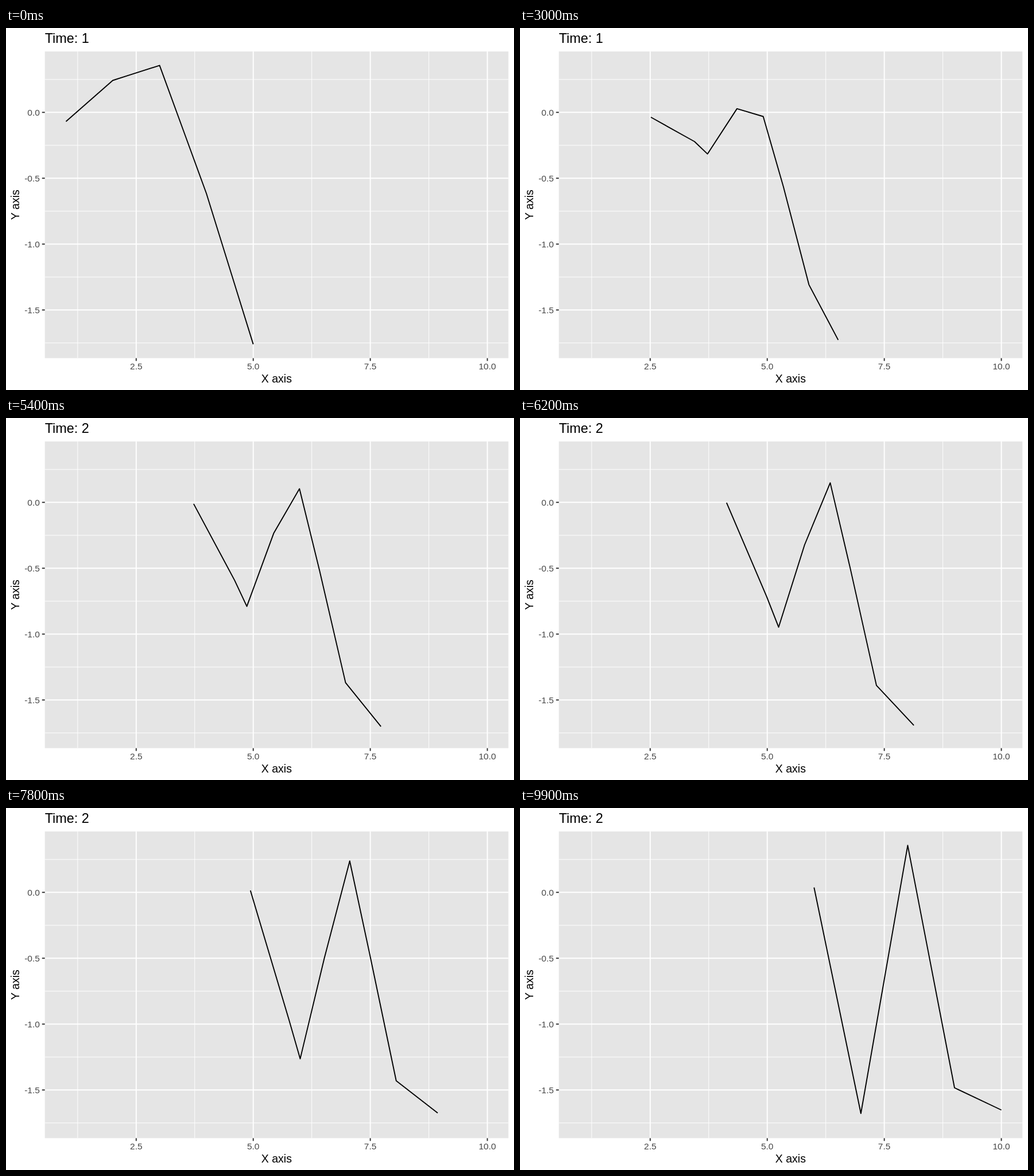
Write an HTML page that moves like this. It is 885 px wide and 632 px high and loops after 10000 ms.

```html
<!DOCTYPE html>
<html lang="en">
<head>
<meta charset="utf-8">
<title>Line morph</title>
<style>
  html, body { margin: 0; width: 100%; height: 100%; overflow: hidden; background: #fff; }
  svg { display: block; font-family: "Liberation Sans", Arial, sans-serif; }
  .tick { font-size: 15.5px; fill: #474747; }
  .label { font-size: 19.5px; text-anchor: middle; }
  .heading { font-size: 23.4px; }
</style>
</head>
<body>
<svg id="stage" width="885" height="632" viewBox="0 0 885 632"></svg>
<script>
const stage = document.getElementById("stage");
const FRAME = 100, FRAMES = 100;
const panel = { left: 67.7, right: 875.3, top: 40.9, bottom: 576.4 };
const sx = x => 226.8 + (x - 2.5) * 81.57;
const sy = y => 147.3 - y * 230;

function add(tag, attrs, text = "") {
  const node = document.createElementNS("http://www.w3.org/2000/svg", tag);
  for (const key in attrs) node.setAttribute(key, attrs[key]);
  node.textContent = text;
  return stage.appendChild(node);
}
const line = (x1, y1, x2, y2, stroke, width) =>
  add("line", { x1, y1, x2, y2, stroke, "stroke-width": width });
const vertical = (x, width) => line(sx(x), panel.top, sx(x), panel.bottom, "#fff", width);
const horizontal = (y, width) => line(panel.left, sy(y), panel.right, sy(y), "#fff", width);

add("rect", {
  x: panel.left, y: panel.top, fill: "#e5e5e5",
  width: panel.right - panel.left, height: panel.bottom - panel.top
});
[1.25, 3.75, 6.25, 8.75].forEach(x => vertical(x, 0.95));
[0.25, -0.25, -0.75, -1.25, -1.75].forEach(y => horizontal(y, 0.95));

for (const y of [0, -0.5, -1, -1.5]) {
  horizontal(y, 1.9);
  line(panel.left - 4.9, sy(y), panel.left, sy(y), "#2d2d2d", 1.9);
  add("text", { x: 58.9, y: sy(y) + 5.6, class: "tick", "text-anchor": "end" }, y.toFixed(1));
}
for (const x of [2.5, 5, 7.5, 10]) {
  vertical(x, 1.9);
  line(sx(x), panel.bottom, sx(x), panel.bottom + 4.9, "#2d2d2d", 1.9);
  add("text", { x: sx(x), y: 596.4, class: "tick", "text-anchor": "middle" }, x.toFixed(1));
}

add("text", { x: 471.4, y: 618.6, class: "label" }, "X axis");
add("text", { transform: "translate(23.4 308.6) rotate(-90)", class: "label" }, "Y axis");
const heading = add("text", { x: 67.7, y: 26.4, class: "heading" });
const curve = add("polyline", {
  fill: "none", stroke: "#000", "stroke-width": 1.9, "stroke-linejoin": "round"
});

const series = (firstX, values) => values.map((y, i) => [sx(firstX + i), sy(y)]);
const from = series(1, [-0.069, 0.2426, 0.3565, -0.616, -1.76]);
const to = series(6, [0.037, -1.678, 0.3565, -1.4835, -1.652]);

const mix = (a, b, t) => a.map((v, i) => v + (b[i] - v) * t);
function along(points, position) {
  const i = Math.min(Math.floor(position), points.length - 2);
  return mix(points[i], points[i + 1], position - i);
}

// Matching positions on both lines, counted in segments from the start.
const pairs = [
  [0, 0], [1, 0.773], [1.299, 1], [2, 1.467],
  [2.572, 2], [3, 2.432], [3.538, 3], [4, 4]
].map(([a, b]) => [along(from, a), along(to, b)]);

function draw(time) {
  const step = Math.floor(time / FRAME) % FRAMES;
  const progress = step / (FRAMES - 1);
  curve.setAttribute("points", pairs.map(([a, b]) => mix(a, b, progress)).join(" "));
  heading.textContent = "Time: " + Math.round(1 + progress);
}

const start = performance.now();
function tick() {
  draw(performance.now() - start);
  requestAnimationFrame(tick);
}
tick();
</script>
</body>
</html>
```
